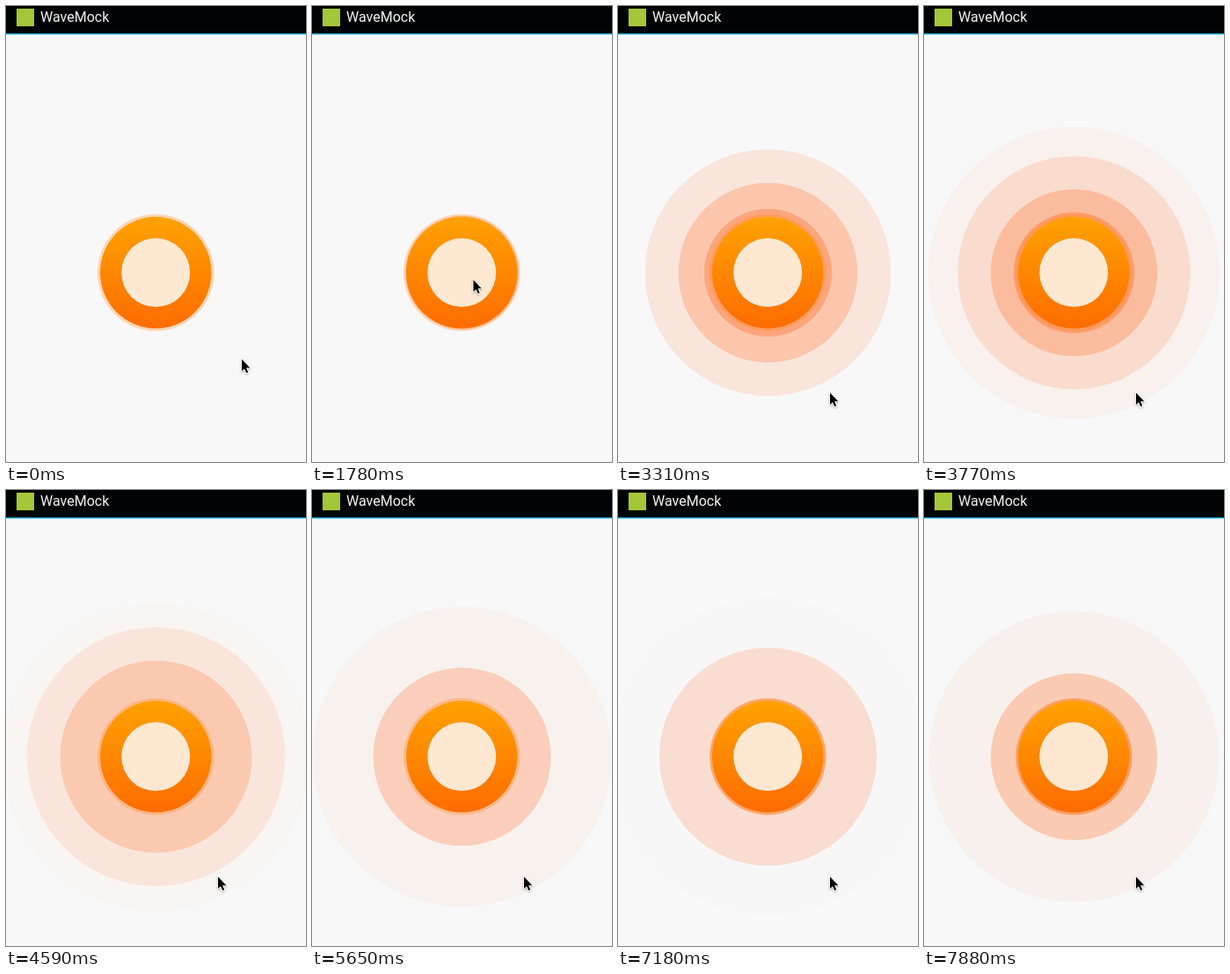
An HTML page that plays this animation: 341 by 517 pixels, repeating every 8000 ms.

```html
<!DOCTYPE html>
<html lang="en">
<head>
<meta charset="utf-8">
<title>Ripple button</title>
<style>
  html, body { margin: 0; height: 100%; overflow: hidden; background: #f8f8f8; }
  svg { display: block; width: 100%; height: 100%; }
  text { font: 16px Roboto, "Noto Sans", sans-serif; fill: #f4f4f4; }
</style>
</head>
<body>
<svg viewBox="0 0 341 517">
  <defs>
    <linearGradient id="orange" x2="0" y2="1">
      <stop offset="0" stop-color="#ffa200"/>
      <stop offset="1" stop-color="#ff6c00"/>
    </linearGradient>
    <filter id="shadow" x="-50%" y="-50%" width="200%" height="200%">
      <feDropShadow dx="0" dy="1" stdDeviation="1" flood-opacity=".35"/>
    </filter>
  </defs>

  <rect width="341" height="517" fill="#f8f8f8"/>
  <g id="rings" fill="#ff6318" transform="translate(170.5 302.4)"></g>

  <g transform="translate(170.2 302.3)">
    <circle r="66.3" fill="#ff8c28" fill-opacity=".32"/>
    <circle r="63.2" fill="url(#orange)"/>
    <circle r="39" fill="#ffe8d1"/>
  </g>

  <rect width="341" height="31" fill="#020304"/>
  <rect y="31" width="341" height="1.4" fill="#18a8dc"/>
  <rect x="12" y="3" width="20" height="20" fill="#a4c639"/>
  <text x="39" y="18">WaveMock</text>

  <path id="cursor" d="M0 0V13.5L3 10.7L5.2 15.6L7.2 14.7L5.1 9.8H9.3Z"
        fill="#000" stroke="#fff" stroke-width="1.6" stroke-linejoin="round"
        paint-order="stroke" filter="url(#shadow)"/>
</svg>
<script>
const LOOP = 8000, STEP = 117.5, FIRST_STEP = 710;
const RING_LIFE = 2830, RING_DELAY = 100;
const RING_MIN = 63.4, RING_GROWTH = 118, RING_OPACITY = 0.36;
const ringStarts = [1610, 2200, 2790, 3380, 4565, 5740, 6905, 7620];

const cursorStops = [
  { time: 600, x: 268, y: 400.5 },
  { time: 1180, x: 180.5, y: 304 },
  { time: 1670, x: 180.5, y: 304 },
  { time: 2360, x: 241, y: 438.5 }
];

const cursor = document.getElementById("cursor");
const ringLayer = document.getElementById("rings");
const rings = ringStarts.map(() =>
  ringLayer.appendChild(document.createElementNS(ringLayer.namespaceURI, "circle")));

const clamp = v => Math.min(1, Math.max(0, v));
const ease = p => (1 - Math.cos(Math.PI * clamp(p))) / 2;

// The picture advances in even steps.
const stepped = t => t < FIRST_STEP ? 0
  : FIRST_STEP + Math.floor((t - FIRST_STEP + 5) / STEP) * STEP;

function cursorAt(t) {
  let { x, y } = cursorStops[0];
  for (let i = 1; i < cursorStops.length; i++) {
    const from = cursorStops[i - 1], to = cursorStops[i];
    const k = ease((t - from.time) / (to.time - from.time));
    x += (to.x - from.x) * k;
    y += (to.y - from.y) * k;
  }
  return `translate(${x} ${y})`;
}

function draw(t) {
  rings.forEach((ring, i) => {
    const age = t - ringStarts[i];
    const visible = age > RING_DELAY && age < RING_LIFE;
    const growth = ease(age / RING_LIFE);
    ring.setAttribute("r", RING_MIN + RING_GROWTH * growth);
    ring.setAttribute("fill-opacity", visible ? RING_OPACITY * (1 - growth) : 0);
  });
  cursor.setAttribute("transform", cursorAt(t));
}

const startTime = performance.now();
function tick() {
  draw(stepped((performance.now() - startTime) % LOOP));
  requestAnimationFrame(tick);
}
tick();
</script>
</body>
</html>
```
